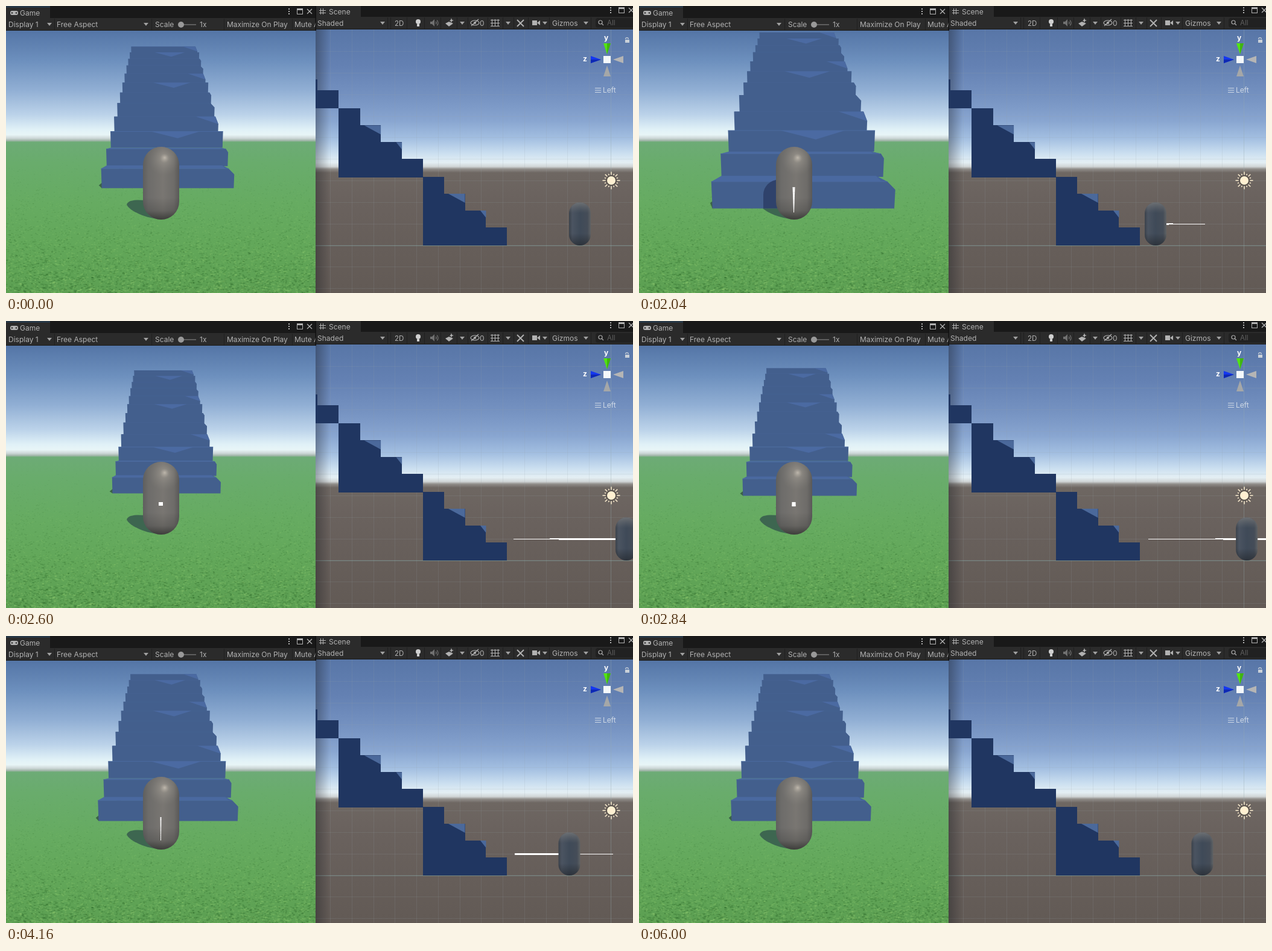
These frames come from a looping animation (1039x477 px, 6080 ms). An HTML page with a canvas:

```html
<!DOCTYPE html>
<html lang="en">
<head>
<meta charset="utf-8">
<title>Dash trail</title>
<style>
html, body { margin: 0; width: 100%; height: 100%; overflow: hidden; background: #191919; }
canvas { display: block; }
</style>
</head>
<body>
<canvas id="stage" width="1039" height="477"></canvas>
<script>
const W = 1039, H = 477, LOOP = 6080, LIFE = 1500;
const view = document.getElementById('stage').getContext('2d');
let c = view;

// Player position along the floor: [ms, scene x]
const KEYS = [[0, 951], [1000, 951], [1200, 899], [1440, 841], [2000, 841], [2240, 931],
  [2600, 1028], [2640, 1040], [2680, 1036], [3240, 935], [3280, 935], [3560, 858],
  [3620, 843], [3680, 843], [3920, 933.5], [LOOP, 933.5]];

function playerX(t) {
  const i = Math.max(1, KEYS.findIndex(k => k[0] >= t));
  const [t0, x0] = KEYS[i - 1], [t1, x1] = KEYS[i];
  return x0 + (x1 - x0) * (t - t0) / (t1 - t0);
}

function rect(x, y, w, h, fill) { c.fillStyle = fill; c.fillRect(x, y, w, h); }

function poly(points, fill) {
  c.beginPath();
  points.forEach(p => c.lineTo(p[0], p[1]));
  c.closePath();
  c.fillStyle = fill;
  c.fill();
}

function line(points, color, width = 1) {
  c.beginPath();
  points.forEach(p => c.lineTo(p[0], p[1]));
  c.strokeStyle = color;
  c.lineWidth = width;
  c.stroke();
}

function ring(x, y, r, color, width = 1) {
  c.beginPath();
  c.arc(x, y, r, 0, 7);
  c.strokeStyle = color;
  c.lineWidth = width;
  c.stroke();
}

function dot(x, y, r, fill) {
  c.beginPath();
  c.arc(x, y, r, 0, 7);
  c.fillStyle = fill;
  c.fill();
}

const INK = '#b2b2b2', BAR = '#2b2b2b';

function text(s, x, y, color = INK, font = '12px') {
  c.font = font + ' Inter, Roboto, sans-serif';
  c.fillStyle = color;
  c.fillText(s, x, y);
}

function ramp(x0, y0, x1, y1, stops) {
  const g = c.createLinearGradient(x0, y0, x1, y1);
  stops.forEach(([at, color]) => g.addColorStop(at, color));
  return g;
}

// Vertical gradient with stops given as screen rows
function rows(stops) {
  const top = stops[0][0], span = stops[stops.length - 1][0] - top;
  return ramp(0, top, 0, top + span, stops.map(([y, color]) => [(y - top) / span, color]));
}

function clipped(x, y, w, h, draw) {
  c.save();
  c.beginPath();
  c.rect(x, y, w, h);
  c.clip();
  draw();
  c.restore();
}

function layer(draw) {
  const canvas = document.createElement('canvas');
  canvas.width = W;
  canvas.height = H;
  c = canvas.getContext('2d');
  draw();
  c = view;
  return canvas;
}

// ---- editor chrome ----
function arrow(x, y) { poly([[x - 4, y - 2], [x + 4, y - 2], [x, y + 3]], '#a0a0a0'); }

function windowIcons(x, y) {
  for (const d of [-4, 0, 4]) rect(x - 1, y + d - 1, 2, 2, INK);
  c.strokeStyle = INK;
  c.lineWidth = 1;
  c.strokeRect(x + 13.5, y - 4.5, 9, 9);
  rect(x + 13, y - 5, 10, 3, INK);
  line([[x + 30, y - 4], [x + 38, y + 4]], INK, 1.3);
  line([[x + 38, y - 4], [x + 30, y + 4]], INK, 1.3);
}

function gameBar() {
  rect(0, 0, 513, 20, '#191919');
  rect(0, 0, 73, 20, BAR);
  rect(0, 1, 73, 1, '#22496a');
  rect(0, 20, 513, 21, BAR);
  c.fillStyle = INK;
  c.beginPath();
  c.roundRect(7, 8, 13, 7, 3);
  c.fill();
  dot(10, 11.5, 1.3, BAR);
  dot(17, 11.5, 1.3, BAR);
  text('Game', 23, 16);
  windowIcons(469, 9);
  text('Display 1', 4, 35);
  arrow(72, 30);
  text('Free Aspect', 84, 35);
  arrow(232, 30);
  text('Scale', 247, 35);
  rect(290, 30, 25, 2, '#5e5e5e');
  dot(290, 31, 5, '#999');
  text('1x', 321, 35);
  text('Maximize On Play', 366, 35);
  for (const x of [80, 241, 361, 474]) rect(x, 21, 1, 19, '#202020');
  clipped(0, 20, 513, 21, () => text('Mute Audio', 478, 35));
  rect(0, 40, 513, 1, '#1b1b1b');
}

function sceneBar() {
  rect(514, 0, 525, 18, '#191919');
  rect(514, 0, 74, 18, BAR);
  rect(514, 18, 525, 21, BAR);
  for (const d of [0, 4]) {
    line([[521.5 + d, 4], [521.5 + d, 14]], INK);
    line([[519, 7.5 + d], [530, 7.5 + d]], INK);
  }
  text('Scene', 535, 14);
  windowIcons(1002, 7);
  text('Shaded', 516, 33);
  arrow(624, 28);
  text('2D', 644, 33, INK, '11.5px');
  dot(683, 26, 4, '#d0d0d0');
  rect(681, 30, 4, 4, '#d0d0d0');
  poly([[703, 26], [706, 26], [710, 22], [710, 34], [706, 30], [703, 30]], '#707070');
  for (const r of [3, 6]) {
    c.beginPath();
    c.arc(710, 28, r, -0.8, 0.8);
    c.strokeStyle = '#707070';
    c.stroke();
  }
  poly([[728, 29], [734, 26], [741, 29], [734, 34]], INK);
  poly([[735, 25], [737, 23], [738, 20], [739, 23], [742, 24], [739, 25], [738, 28], [737, 25]], INK);
  arrow(756, 28);
  c.beginPath();
  c.ellipse(777, 28, 7, 4, 0, 0, 7);
  c.strokeStyle = INK;
  c.lineWidth = 1.2;
  c.stroke();
  dot(777, 28, 2, INK);
  line([[771, 33], [783, 22]], INK, 1.3);
  text('0', 785, 33);
  for (const d of [0, 5, 10]) {
    line([[805.5 + d, 22], [805.5 + d, 34]], INK);
    line([[803, 23.5 + d], [818, 23.5 + d]], INK);
  }
  arrow(832, 28);
  line([[847, 23], [858, 34]], INK, 2);
  line([[858, 23], [847, 34]], INK, 2);
  rect(872, 24, 8, 8, INK);
  poly([[880, 28], [885, 24], [885, 32]], INK);
  arrow(893, 28);
  text('Gizmos', 905, 33);
  arrow(961, 28);
  for (const x of [632, 637, 664, 693, 720, 747, 765, 798, 823, 841, 865, 900, 969]) rect(x, 19, 1, 19, '#1f1f1f');
  c.fillStyle = '#212121';
  c.beginPath();
  c.roundRect(977, 20, 70, 16, 4);
  c.fill();
  ring(985, 27, 3, '#aaa', 1.2);
  line([[987, 29], [990, 32]], '#aaa', 1.2);
  text('All', 996, 32, '#606060', '11.5px');
  rect(513, 38, 526, 1, '#1b1b1b');
}

// ---- game view backdrop ----
function gameBack() {
  rect(0, 41, 513, 186, rows([[41, '#5475a6'], [90, '#6c8fbd'], [140, '#91afd4'], [180, '#bbd2e9'],
    [205, '#e0f1f7'], [214, '#e8f5f7'], [220, '#ccd6d6'], [224, '#9eb3a6'], [226, '#6fae78']]));
  rect(0, 226, 513, 251, rows([[226, '#6dab76'], [260, '#69ac6c'], [330, '#66ab61'], [400, '#62a759'], [477, '#5c9f52']]));
  let seed = 7;
  const rnd = () => (seed = seed * 16807 % 2147483647) / 2147483647;
  clipped(0, 232, 513, 245, () => {
    for (let i = 0; i < 6500; i++) {
      const d = Math.sqrt(rnd()), y = 236 + d * 241, x = rnd() * 513;
      const shade = rnd() < 0.5 ? '25,80,25' : '165,220,125';
      rect(x, y, 1 + rnd() * 4 * d, 0.6 + d * 1.2, `rgba(${shade},${0.05 + d * 0.16})`);
    }
  });
}

// ---- scene view backdrop ----
function sceneBack() {
  rect(513, 39, 526, 438, rows([[39, '#5876a7'], [100, '#6481b3'], [150, '#7592c1'], [190, '#88a5d0'],
    [220, '#a3bfe1'], [245, '#cbdff0'], [260, '#e4eff4'], [267, '#d0d5d6'], [271, '#908d89'],
    [277, '#6e6762'], [320, '#6a625e'], [477, '#625a55']]));
  for (let x = 1002; x > 514; x -= 35.77) rect(Math.round(x), 39, 1, 438, 'rgba(150,160,165,.17)');
  for (let y = 469; y > 40; y -= 35.8) rect(513, Math.round(y), 526, 1, 'rgba(150,160,165,.17)');
  rect(1002, 39, 1, 438, 'rgba(150,175,180,.25)');
  rect(513, 398, 526, 1, 'rgba(140,185,180,.45)');
  rect(513, 39, 24, 438, ramp(513, 0, 537, 0, [[0, 'rgba(20,22,28,.35)'], [1, 'rgba(20,22,28,0)']]));
  const dark = '#203661', lit = '#4b699b';
  [[691, 398], [551.6, 284.4]].forEach(([x, floor]) => {
    const left = Math.floor(x);
    for (let k = 0; k < 4; k++) {
      const top = Math.round(floor - 30 - 28 * k);
      rect(left, top, Math.round(x + 139 - 34.7 * k) - left, Math.ceil(floor) - top, dark);
    }
    poly([[x + 42, floor - 86], [x + 69.5, floor - 86], [x + 69.5, floor - 71]], lit);
    poly([[x + 95, floor - 58], [x + 104.5, floor - 58], [x + 104.5, floor - 46]], lit);
  });
  rect(513, 140, 38, 30, dark);
  rect(513, 122, 3, 18, dark);
}

function gizmo() {
  poly([[990, 62], [1002, 62], [996, 80]], '#52e412');
  poly([[996, 62], [1002, 62], [996, 80]], '#3fb50e');
  poly([[969, 83], [969, 95], [986, 89]], '#1437f0');
  poly([[969, 89], [969, 95], [986, 89]], '#0d28b5');
  poly([[1006, 89], [1023, 83], [1023, 95]], '#b5b5b5');
  poly([[996, 99], [1002, 117], [990, 117]], '#a5a7a8');
  rect(990, 83, 12, 12, '#f4f8fb');
  text('y', 991, 57, '#fff', 'bold 12px');
  text('z', 956, 92, '#fff', 'bold 12px');
  for (const y of [136, 139.5, 143]) rect(976, y, 10, 1, '#cfd9e6');
  text('Left', 989, 144, '#cfd9e6');
  rect(1026, 56, 7, 5, '#c9d0d8');
  c.beginPath();
  c.arc(1029, 55, 2.4, Math.PI, 0);
  c.strokeStyle = '#c9d0d8';
  c.lineWidth = 1.2;
  c.stroke();
  for (let i = 0; i < 16; i++) {
    const a = i * Math.PI / 8, r = i % 2 ? 12 : 14.5;
    line([[1003 + 9.5 * Math.cos(a), 290 + 9.5 * Math.sin(a)], [1003 + r * Math.cos(a), 290 + r * Math.sin(a)]], '#fff0d2', 1.5);
  }
  dot(1003, 290, 7, '#fff0d2');
  ring(1003, 290, 8, '#4b443c', 1);
}

// ---- perspective staircase: a = sideways, h = height, z = distance ----
function project(a, h, z) {
  const u = h - 80.6, depth = 0.993 * z - 0.119 * u;
  return [256.5 + a * 377.6 / depth, 259 - 377.6 * (0.993 * u + 0.119 * z) / depth];
}

function stairs(x) {
  const z0 = x - 614, L = -89.2, R = 110.2, rise = 28.7, lit = '#4b6aa2';
  const at = z => (a, h) => project(a, h, z);
  poly([project(L, 0, z0), project(-99, 0, z0 + 20), project(-99, 0, z0 + 300), project(L, 0, z0 + 300)], '#3b6148');
  for (let k = 11; k >= 0; k--) {
    const z = z0 + 35 * k, kind = k % 4, low = rise * k, top = low + (kind ? rise : 30);
    const p = at(z), back = at(z + 35), cut = [9, 4, 0, 6][kind], drop = [9, 6, 0, 14][kind];
    poly([p(L, top), p(R - cut, top), back(R - cut, top), back(L, top)], '#4a69a0');
    if (kind < 2) poly([p(R - cut, top), p(R, top - drop), back(R, top - drop), back(R - cut, top)], '#45639a');
    poly([p(L, low), p(L, top), p(R - cut, top), p(R, top - drop), p(R, low)], '#435f8d');
    if (k < 3) line([p(L, top), p(R - cut, top)], '#4b6a9f');
    if (kind === 2) poly([p(-17.5, top), p(69, top), p(30, top - 12)], lit);
    if (kind === 3) poly([p(67, top), p(R - cut, top), p(R, top - drop)], lit);
  }
}

function shadow(x) {
  const base = project(0, 0, x - 614)[1];
  clipped(0, Math.max(base, 300), 513, 200, () => {
    c.beginPath();
    c.moveTo(200, 330);
    c.bezierCurveTo(203, 320, 225, 322, 250, 325);
    c.lineTo(262, 354);
    c.bezierCurveTo(238, 356, 204, 341, 200, 330);
    c.fillStyle = '#3d6650';
    c.fill();
  });
  if (base > 322) {
    const top = 322 - (base - 322) * 2.3;
    clipped(0, 41, 513, base - 41, () => {
      c.beginPath();
      c.roundRect(206, top, 56, 150, 25);
      c.fillStyle = '#2f426b';
      c.fill();
    });
  }
}

function pill(x, y, w, h, r, fills) {
  c.beginPath();
  c.roundRect(x, y, w, h, r);
  for (const f of fills) { c.fillStyle = f; c.fill(); }
}

function gamePlayer() {
  const glow = c.createRadialGradient(263, 252, 0, 262, 256, 26);
  glow.addColorStop(0, 'rgba(214,206,192,.75)');
  glow.addColorStop(0.3, 'rgba(170,165,155,.4)');
  glow.addColorStop(1, 'rgba(140,138,132,0)');
  pill(227, 234, 60, 121, 30, [
    ramp(227, 0, 287, 0, [[0, '#5f5f5e'], [0.15, '#6d6c6a'], [0.55, '#797672'], [0.85, '#6e6c69'], [1, '#5a5958']]),
    glow,
    ramp(0, 318, 0, 355, [[0, 'rgba(30,32,30,0)'], [0.6, 'rgba(30,32,30,.2)'], [1, 'rgba(30,32,30,.65)']])]);
}

function scenePlayer(x) {
  const l = x - 18;
  pill(l, 326.5, 36, 71.5, 18, [
    ramp(l, 0, l + 36, 0, [[0, '#3b424b'], [0.15, '#4b5461'], [0.5, '#3f4a58'], [0.85, '#454d58'], [1, '#5f6264']]),
    ramp(0, 326, 0, 344, [[0, 'rgba(130,130,128,.7)'], [1, 'rgba(110,112,114,0)']]),
    ramp(0, 378, 0, 398, [[0, 'rgba(25,27,30,0)'], [1, 'rgba(25,27,30,.5)']])]);
}

// ---- trail: tapers with path length, fades out by age ----
function trail(t) {
  const segs = [];
  let len = 0, prev = playerX(Math.max(0, t - LIFE));
  for (let s = Math.max(0, t - LIFE) + 10; s <= t; s += 10) {
    const x = playerX(s);
    if (x !== prev) {
      len += Math.abs(x - prev);
      segs.push({ a: Math.min(x, prev), b: Math.max(x, prev), len });
    }
    prev = x;
  }
  segs.forEach(s => s.w = 3.5 * s.len / len);
  return segs;
}

function sceneTrail(segs) {
  for (const s of segs) {
    if (s.w < 0.42) continue;
    const h = s.w < 1.9 ? 1 : s.w < 2.1 ? 2 : 3;
    rect(Math.floor(s.a), h > 1 ? 361 : 362, Math.ceil(s.b) - Math.floor(s.a), h, '#fff');
  }
}

function gameTrail(segs, x, t) {
  const row = d => 214 + 17830 / d;
  for (const s of segs) {
    const near = 223 - (s.b - x), far = Math.min(205, 223 - (s.a - x));
    if (s.w < 0.3 || near >= 205 || near < 30) continue;
    const w = Math.max(1, s.w * 365 / near);
    rect(256.5 - w / 2, row(far), w, row(near) - row(far) + 0.3, '#fff');
  }
  if (t > 2240 && t <= 2640) rect(253, 301, 7, 6, '#fff');
}

const back = layer(() => { gameBack(); sceneBack(); });
const front = layer(() => {
  gameBar();
  sceneBar();
  gizmo();
  rect(512.5, 0, 1.5, 41, '#111');
});

function frame(now) {
  const t = Math.floor(now % LOOP / 40) * 40, x = playerX(t), segs = trail(t);
  c.drawImage(back, 0, 0);
  clipped(0, 41, 513, 436, () => {
    stairs(x);
    shadow(x);
    gamePlayer();
    gameTrail(segs, x, t);
  });
  clipped(513, 39, 526, 438, () => {
    sceneTrail(segs);
    scenePlayer(x);
  });
  c.drawImage(front, 0, 0);
  requestAnimationFrame(frame);
}
requestAnimationFrame(frame);
</script>
</body>
</html>
```
